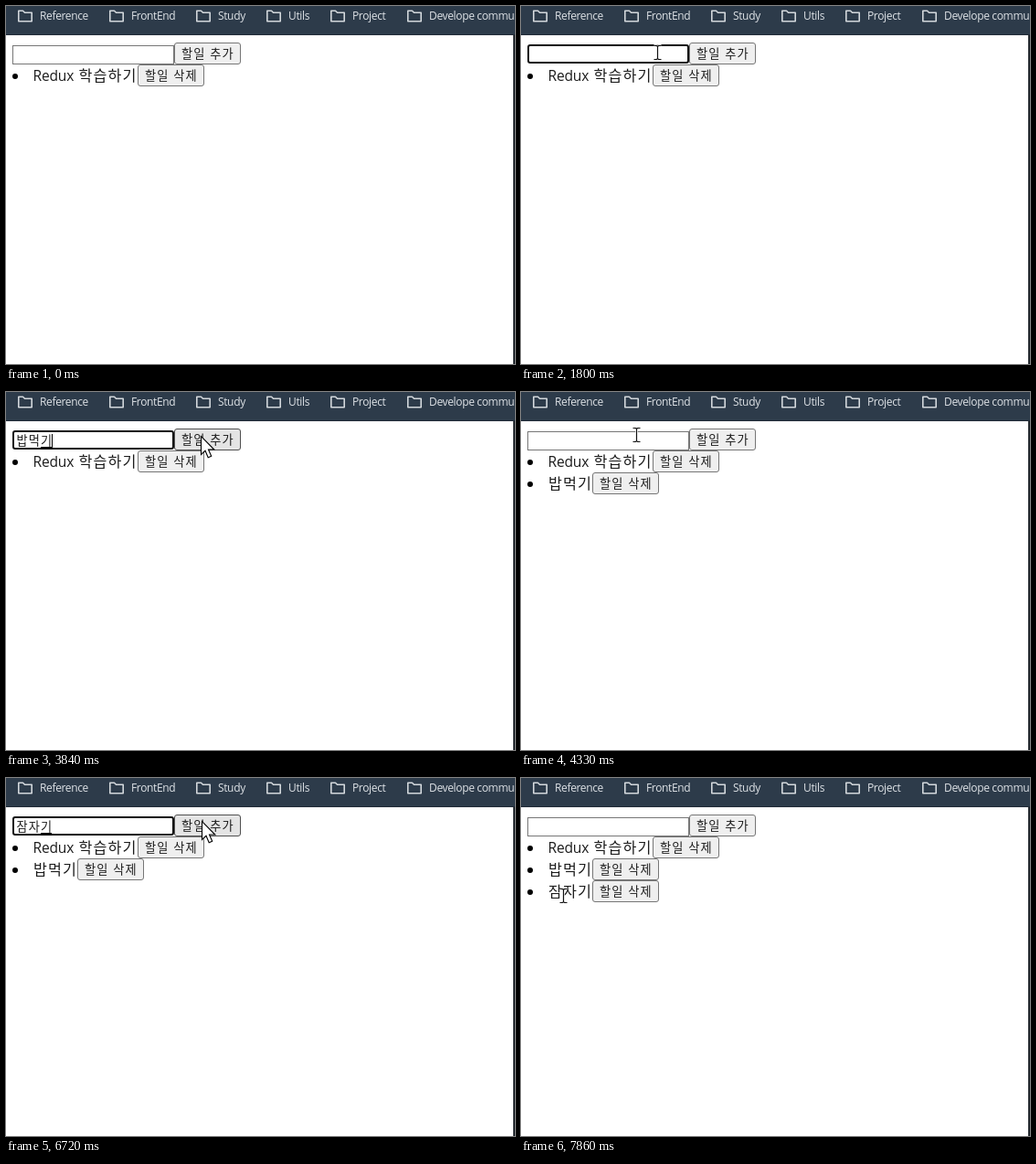
An HTML page for the animation above (8000 ms loop, 557 by 392 pixels).

```html
<!DOCTYPE html>
<html lang="ko">
<head>
<meta charset="utf-8">
<title>Todo</title>
<style>
  html, body { margin: 0; width: 100%; height: 100%; overflow: hidden; background: #fff; }
  svg { display: block; width: 557px; height: 392px; }
  text { white-space: pre; }
  .ko { font-family: "Noto Sans CJK KR", "Noto Sans CJK", sans-serif; font-weight: 300; fill: #1c1c1c; }
  .small { font-size: 13.2px; letter-spacing: 1.1px; }
  .item { font-size: 16.2px; letter-spacing: 1.1px; }
  .latin { font: 15.6px "Open Sans", "Noto Sans", sans-serif; letter-spacing: -.2px; fill: #1c1c1c; }
  .mark { font: 12px "Open Sans", "Noto Sans", sans-serif; letter-spacing: -.35px; fill: #dfe3e7; }
  .folder { fill: none; stroke: #d3d8dc; stroke-width: 1.6; stroke-linejoin: round; }
  .button { stroke: #767676; }
</style>
</head>
<body>
<svg id="stage" viewBox="0 0 557 392">
  <rect width="557" height="392" fill="#fff"/>
  <rect x="555" y="31" width="2" height="361" fill="#23282e"/>
  <rect width="557" height="31" fill="#2d3b4a"/>
  <rect y="31" width="557" height="1" fill="#222c38"/>
  <g id="bookmarks"></g>
  <g id="field">
    <rect id="frame" x="7.5" y="43.5" width="176" height="20" fill="#fff" stroke="#767676"/>
    <rect id="ring" x="8" y="43" width="175" height="19" rx="2" fill="#fff" stroke="#101010" stroke-width="2"/>
    <text id="typed" class="ko small" x="11.5" y="57.5"></text>
    <rect id="underline" y="60" width="12" height="1"/>
    <rect id="caret" y="46" width="1" height="15"/>
  </g>
  <g id="rows"></g>
  <g id="arrow">
    <path d="M.5 .5V20.5L5 16.3L8.2 23.7L11.7 22.2L8.5 15H14.8Z" fill="#fff" stroke="#000" stroke-width="1.1"/>
  </g>
  <g id="beam" fill="none">
    <path d="M-3.5 -7.5H-.5L.5 -6.5L1.5 -7.5H4.5M.5 -6.5V6.5M-3.5 7.5H-.5L.5 6.5L1.5 7.5H4.5" stroke="#fff" stroke-width="2.6"/>
    <path d="M-3.5 -7.5H-.5L.5 -6.5L1.5 -7.5H4.5M.5 -6.5V6.5M-3.5 7.5H-.5L.5 6.5L1.5 7.5H4.5" stroke="#111" stroke-width="1.2"/>
  </g>
</svg>
<script>
const LOOP = 8000;
const CELL = 13.33;
const $ = id => document.getElementById(id);

function add(parent, tag, attrs, text = '') {
  const el = document.createElementNS('http://www.w3.org/2000/svg', tag);
  for (const key in attrs) el.setAttribute(key, attrs[key]);
  el.textContent = text;
  parent.appendChild(el);
  return el;
}

const bookmarks = [['Reference', 13], ['FrontEnd', 113], ['Study', 208],
  ['Utils', 285], ['Project', 355], ['Develope commu', 439]];
for (const [label, x] of bookmarks) {
  add($('bookmarks'), 'path', {
    class: 'folder',
    d: `M${x + .8} 5.3H${x + 5.5}L${x + 7.5} 7.3H${x + 15.2}V16.7H${x + .8}Z`
  });
  add($('bookmarks'), 'text', { class: 'mark', x: x + 24, y: 15 }, label);
}

const buttons = [];
function addButton(parent, x, y, label) {
  const face = add(parent, 'rect', {
    class: 'button', x: x + .5, y: y + .5, width: 72, height: 23, rx: 2.5
  });
  add(parent, 'text', { class: 'ko small', x: x + 8, y: y + 17 }, label);
  buttons.push({ x, y, face });
}

function addRow(index, label, textX, buttonX, since) {
  const y = 64 + index * 24;
  const g = add($('rows'), 'g', {});
  add(g, 'circle', { cx: 10, cy: y + 13, r: 3 });
  if (!index) add(g, 'text', { class: 'latin', x: 29.5, y: y + 18 }, 'Redux');
  add(g, 'text', { class: 'ko item', x: textX, y: y + 18 }, label);
  addButton(g, buttonX, y, '할일 삭제');
  return { g, since };
}

addButton($('field'), 184, 40, '할일 추가');
const rows = [
  addRow(0, '학습하기', 79.5, 144, 0),
  addRow(1, '밥먹기', 30, 78, 3860),
  addRow(2, '잠자기', 30, 78, 6920)
];

// [time, x, y]: pointer hot spot
const path = [
  [70, 468, 372], [400, 169, 28], [540, 169, 28], [800, 196, 60], [1000, 188, 56],
  [1330, 149, 51], [3025, 149, 51], [3090, 156, 59], [3225, 156, 59],
  [3600, 212, 48], [4060, 214, 47], [4330, 126, 47], [4480, 118, 49],
  [6245, 118, 49], [6590, 212, 48], [6720, 214, 47], [6920, 214, 47],
  [7110, 176, 117], [7160, 176, 117], [7500, 82, 146], [7860, 46, 129], [8000, 46, 129]
];

// [time, focused, text, caret visible]
const states = [
  [0, 0, '', 0], [1200, 1, '', 1], [1800, 1, '', 0],
  [2280, 1, '바', 0], [2430, 1, '밥', 0], [2560, 1, '밥머', 0], [2760, 1, '밥먹기', 1],
  [3860, 0, '', 0], [4400, 1, '', 1], [4880, 1, '', 0],
  [5220, 1, 'ㅈ', 0], [5320, 1, '자', 0], [5400, 1, '잠', 0], [5490, 1, '잠자', 0],
  [5710, 1, '잠자ㄱ', 0], [5760, 1, '잠자기', 0], [6920, 0, '', 0]
];

const inside = (x, y, left, top, w, h) =>
  x >= left && x < left + w && y >= top && y < top + h;
const show = (el, on) => el.setAttribute('visibility', on ? 'visible' : 'hidden');

// The pointer advances in discrete steps of about 65 ms.
function pointerAt(t) {
  const i = path.findIndex(p => p[0] > t);
  if (i < 0) return path[path.length - 1].slice(1);
  if (i === 0) return [-99, -99];
  const [t0, x0, y0] = path[i - 1], [t1, x1, y1] = path[i];
  const steps = Math.max(1, Math.round((t1 - t0) / 65));
  const p = Math.floor((t - t0) / (t1 - t0) * steps) / steps;
  return [Math.round(x0 + (x1 - x0) * p), Math.round(y0 + (y1 - y0) * p)];
}

function draw(t) {
  const [, focused, text, caret] = states.findLast(s => s[0] <= t);
  show($('ring'), focused);
  show($('frame'), !focused);
  $('typed').textContent = text;
  show($('underline'), text);
  $('underline').setAttribute('x', Math.round(11 + (text.length - 1) * CELL));
  show($('caret'), caret);
  $('caret').setAttribute('x', text ? Math.round(10 + text.length * CELL) : 11);
  for (const row of rows) row.g.style.display = t >= row.since ? '' : 'none';

  const [x, y] = pointerAt(t);
  for (const b of buttons) {
    const hover = inside(x, y, b.x, b.y, 73, 24);
    b.face.setAttribute('fill', hover ? '#e4e4e4' : '#efefef');
    b.face.style.stroke = hover ? '#4f4f4f' : '';
  }
  const overText = inside(x, y, 7, 43, 177, 21) ||
    (t > 7300 && inside(x, y, 0, 112, 90, 40));
  show($('arrow'), !overText);
  show($('beam'), overText);
  $(overText ? 'beam' : 'arrow').setAttribute('transform', `translate(${x} ${y})`);
}

const start = performance.now();
function tick() {
  draw((performance.now() - start) % LOOP);
  requestAnimationFrame(tick);
}
tick();
</script>
</body>
</html>
```
